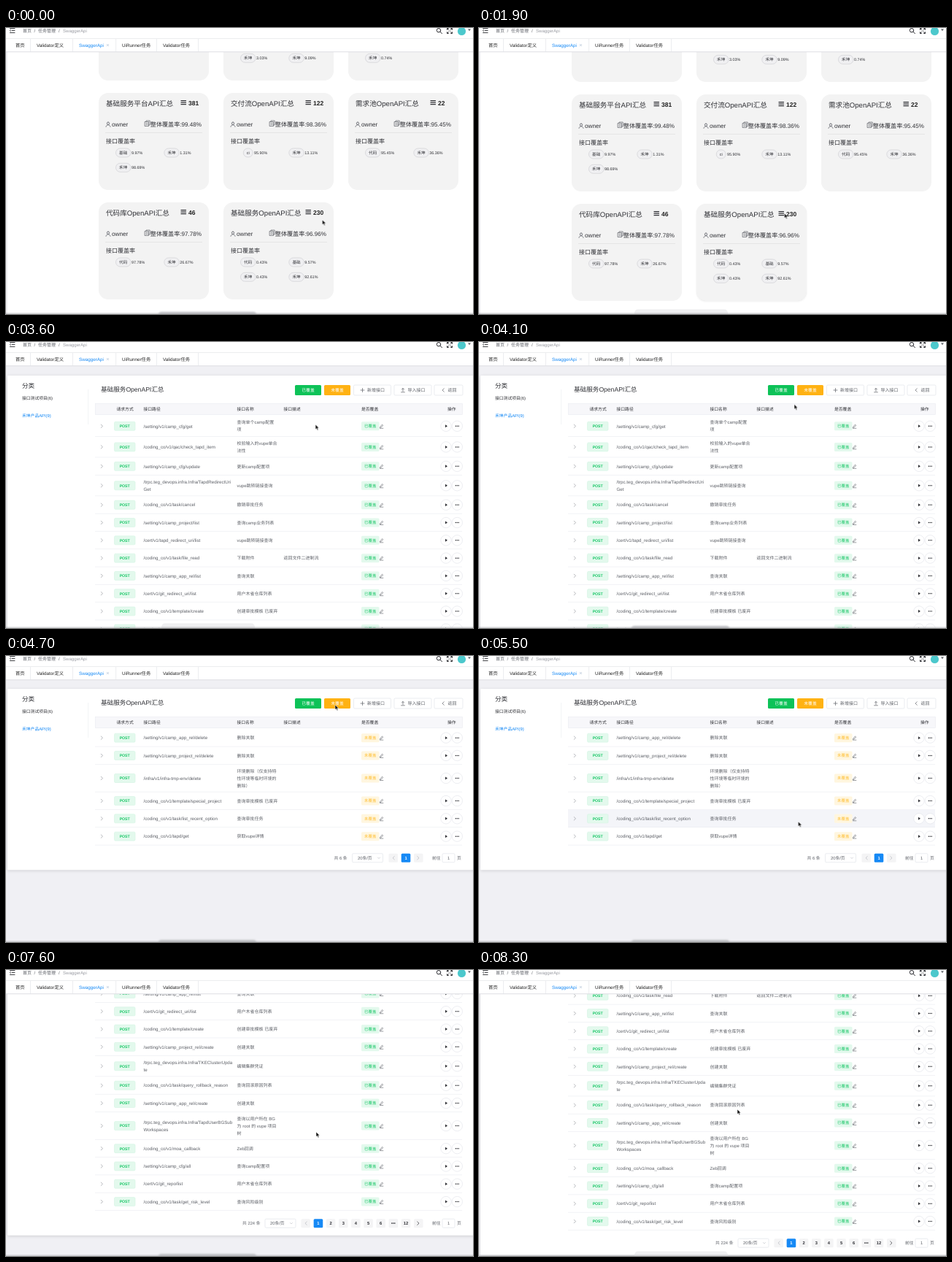
Animation, 640 px wide and 392 px high, one loop 8400 ms. Source, as an HTML page:

```html
<!DOCTYPE html>
<html lang="zh-CN">
<head>
<meta charset="utf-8">
<title>SwaggerApi</title>
<style>
html, body { margin: 0; width: 100%; height: 100%; overflow: hidden; background: #f0f0f4; }
svg { display: block; width: 640px; height: 392px; }
text { font-family: "Liberation Sans", "Noto Sans CJK SC", "Noto Sans CJK", sans-serif; text-rendering: geometricPrecision; white-space: pre; }
.icon { fill: none; stroke-linecap: round; stroke-linejoin: round; }
</style>
</head>
<body>
<svg id="stage" viewBox="0 0 640 392"></svg>
<script>
const LOOP = 8400;
const GREEN = '#13c563', BLUE = '#1689f5', INK = '#5c5f66', DARK = '#303136', LINE = '#e9ebf0';
let css = '';

// Animated group: stops are [ms, value]
function animate(name, stops, property, timing) {
  const all = [...stops, [LOOP, stops[stops.length - 1][1]]];
  const frames = all.map(([ms, v]) => `${ms / LOOP * 100}%{${property(v)}}`).join('');
  css += `@keyframes ${name}{${frames}}.${name}{animation:${name} ${LOOP}ms ${timing} infinite}`;
}
const move = (name, stops) => animate(name, stops, ([x, y]) => `transform:translate(${x}px,${y}px)`, 'linear');
const toggle = (name, stops) => animate(name, stops, v => `opacity:${v}`, 'step-end');

const group = (cls, content) => `<g class="${cls}">${content}</g>`;
const rect = (x, y, w, h, fill, rx = 0, stroke = 'none', extra = '') =>
  `<rect x="${x}" y="${y}" width="${w}" height="${h}" rx="${rx}" fill="${fill}" stroke="${stroke}" stroke-width=".6" ${extra}/>`;
const icon = (x, y, d, color = INK, width = .8) =>
  `<path class="icon" transform="translate(${x} ${y})" d="${d}" stroke="${color}" stroke-width="${width}"/>`;
// y is the vertical middle of the line
const text = (x, y, s, size = 6, color = INK, anchor = 'start', weight = 400) =>
  `<text x="${x}" y="${y + size * .36}" font-size="${size}" fill="${color}" text-anchor="${anchor}" font-weight="${weight}">${s}</text>`;
const lines = (x, y, s, size) => {
  const parts = s.split('|');
  return parts.map((p, i) => text(x, y + (i - (parts.length - 1) / 2) * 10, p, size)).join('');
};
const RIGHT = 'M-1.3 -2.2L1 0L-1.3 2.2', LEFT = 'M1.3 -2.2L-1 0L1.3 2.2';
const DOWN = 'M-1.5 -.7L0 .8L1.5 -.7';

// ---- Overview cards ----
function card(col, row, title, count, total, tags) {
  const x = 127 + col * 171, y = 89 + row * 150;
  let out = rect(x, y, 151, 133, '#f3f3f3', 13);
  if (title === '基础服务OpenAPI汇总')
    out += group('cardHover', rect(x, y, 151, 133, '#f3f3f3', 13, 'none', 'style="filter:drop-shadow(0 1px 1px #0001)"'));
  out += text(x + 10, y + 14.4, title, 9.6, DARK)
    + icon(x + 113, y + 13.2, 'M0 -2.5H6.5M0 0H6.5M0 2.5H6.5', DARK, 1.2)
    + text(x + 123, y + 14, count, 8.5, '#222', 'start', 700)
    + icon(x + 13, y + 43, 'M0 -3a1.7 1.7 0 1 1 0 3.4a1.7 1.7 0 1 1 0 -3.4M-3 3.4C-2.6 -.2 2.6 -.2 3 3.4', INK, .8)
    + text(x + 18, y + 43.3, 'owner', 8.2, DARK)
    + icon(x + 63.5, y + 39.5, 'M0 0H5V6H0ZM1.5 0V-1.5H6.7V4.5H5M1.3 2H3.7M1.3 4H3.7', INK, .7)
    + text(x + 141, y + 43.3, `整体覆盖率:${total}%`, 8.1, DARK, 'end')
    + rect(x + 9, y + 54, 133, .6, '#dcdcdc')
    + text(x + 10, y + 66, '接口覆盖率', 8, DARK);
  tags.forEach(([label, pct], i) => {
    if (!label) return;
    const tx = x + 23.5 + i % 2 * 66.3, ty = y + 82 + (i >> 1) * 20.3;
    const w = label === 'ci' ? 13 : 20.5;
    out += rect(tx + (20.5 - w) / 2, ty - 6, w, 12, '#f0f0f2', 6, '#c9cace')
      + text(tx + 10.2, ty, label, 5.6, DARK, 'middle', 500)
      + text(tx + 21.5 - (20.5 - w) / 2 * .8, ty, pct + '%', 5.4, DARK);
  });
  return out;
}
const TEAM = '禾坤';
const overview = rect(2, 30, 638, 400, '#fff') + group('cardShift',
  card(0, -1, '', '', '', [])
  + card(1, -1, '', '', '', [[], [], [TEAM, '3.03'], [TEAM, '9.09']])
  + card(2, -1, '', '', '', [[], [], [TEAM, '0.74']])
  + card(0, 0, '基础服务平台API汇总', 381, '99.48', [['基础', '9.97'], [TEAM, '1.31'], [TEAM, '98.69']])
  + card(1, 0, '交付流OpenAPI汇总', 122, '98.36', [['ci', '95.90'], [TEAM, '13.11']])
  + card(2, 0, '需求池OpenAPI汇总', 22, '95.45', [['代码', '95.45'], [TEAM, '36.36']])
  + card(0, 1, '代码库OpenAPI汇总', 46, '97.78', [['代码', '97.78'], [TEAM, '26.67']])
  + card(1, 1, '基础服务OpenAPI汇总', 230, '96.96', [['代码', '0.43'], ['基础', '9.57'], [TEAM, '0.43'], [TEAM, '92.61']]));

// ---- Interface tables: path, name, description ('|' breaks a line) ----
const RPC = '/trpc.teg_devops.infra.Infra/';
const coveredRows = [
  ['/setting/v1/camp_cfg/get', '查询单个camp配置|项'],
  ['/coding_co/v1/qac/check_tapd_item', '校验输入的vupe单合|法性'],
  ['/setting/v1/camp_cfg/update', '更新camp配置项'],
  [RPC + 'TapdRedirectUri|Get', 'vupe跳转链接查询'],
  ['/coding_co/v1/task/cancel', '撤销审批任务'],
  ['/setting/v1/camp_project/list', '查询camp业务列表'],
  ['/cert/v1/tapd_redirect_uri/list', 'vupe跳转链接查询'],
  ['/coding_co/v1/task/file_read', '下载附件', '返回文件二进制流'],
  ['/setting/v1/camp_app_rel/list', '查询关联'],
  ['/cert/v1/git_redirect_uri/list', '用户木雀仓库列表'],
  ['/coding_co/v1/template/create', '创建审批模板 已废弃'],
  ['/setting/v1/camp_project_rel/create', '创建关联'],
  [RPC + 'TKEClusterUpda|te', '编辑集群凭证'],
  ['/coding_co/v1/task/query_rollback_reason', '查询回滚原因列表'],
  ['/setting/v1/camp_app_rel/create', '创建关联'],
  [RPC + 'TapdUserBGSub|Workspaces', '查询以用户所在 BG|为 root 的 vupe 项目|树'],
  ['/coding_co/v1/moa_callback', 'Zeb回调'],
  ['/setting/v1/camp_cfg/all', '查询camp配置项'],
  ['/cert/v1/git_repo/list', '用户木雀仓库列表'],
  ['/coding_co/v1/task/get_risk_level', '查询风险级别'],
];
const uncoveredRows = [
  ['/setting/v1/camp_app_rel/delete', '删除关联'],
  ['/setting/v1/camp_project_rel/delete', '删除关联'],
  ['/infra/v1/infra-tmp-env/delete', '环境删除（仅支持特|性环境等临时环境的|删除）'],
  ['/coding_co/v1/template/special_project', '查询审批模板 已废弃'],
  ['/coding_co/v1/task/list_recent_option', '查询审批任务'],
  ['/coding_co/v1/tapd/get', '获取vupe详情'],
];
const ROW_HEIGHT = [0, 24.3, 28.6, 37.8];

function pager(y, total, pages, left) {
  const first = 548 - (pages.length - 1) * 17.15;
  let out = text(left, y, `共 ${total} 条`, 5.8)
    + rect(left + 27 + (total < 10 ? -2 : 4), y - 6, 42, 12, '#fff', 1.5, '#dcdfe6')
    + text(first - 66, y, '20条/页', 5.8) + icon(first - 37, y, DOWN, '#b5b8bf', .6)
    + rect(first - 23.5, y - 6, 12.5, 12, '#f4f4f5', 1.5) + icon(first - 17, y, LEFT, '#b5b8bf', .7);
  pages.forEach((p, i) => {
    const x = first + i * 17.15;
    out += rect(x - 6.3, y - 6, 12.6, 12, i ? '#f4f4f5' : BLUE, 1.5)
      + text(x, y, p, 5.8, i ? DARK : '#fff', 'middle', 700);
  });
  return out + rect(559, y - 6, 12.5, 12, '#f4f4f5', 1.5)
    + icon(565, y, RIGHT, pages.length > 1 ? DARK : '#b5b8bf', .7)
    + text(584, y, '前往', 5.8) + rect(598, y - 6, 17, 12, '#fff', 1.5, '#dcdfe6')
    + text(606.5, y, '1', 5.8, INK, 'middle') + text(618, y, '页', 5.8);
}

function table(rows, hoverIndex, hoverClass, label, color, tint, pages, total, pagerLeft) {
  let y = 100, out = '';
  rows.forEach(([path, name, note = ''], i) => {
    const h = ROW_HEIGHT[Math.max(path.split('|').length, name.split('|').length)];
    const mid = y + h / 2;
    if (i === hoverIndex) out += group(hoverClass, rect(122, y, 503, h, '#f4f5f9'));
    out += rect(122, y + h - .5, 503, .6, LINE)
      + icon(131.5, mid, RIGHT, '#888b92', .6)
      + rect(148.5, mid - 6, 28.5, 12, '#e3f9ed', 1.5, '#d3f4e2')
      + text(162.7, mid, 'POST', 5.2, GREEN, 'middle', 700)
      + lines(188.5, mid, path, 6.2) + lines(316.5, mid, name, 6) + text(380.5, mid, note)
      + rect(487, mid - 6, 24.5, 12, tint, 1.5)
      + text(499.2, mid, label, 5.4, color, 'middle')
      + icon(514.5, mid, 'M-1.8 1.2L1 -2.2L2.2 -1.2L-.5 1.9L-2 2ZM-2 3H2.4', INK, .6);
    for (const x of [603, 618.3])
      out += `<circle cx="${x}" cy="${mid}" r="7.2" fill="#fff" stroke="#dfe1e7" stroke-width=".6"/>`;
    out += `<path d="M602 ${mid - 2}L605 ${mid}L602 ${mid + 2}Z" fill="${DARK}"/>`;
    for (const dx of [-2, 0, 2]) out += `<circle cx="${618.3 + dx}" cy="${mid}" r=".75" fill="${DARK}"/>`;
    y += h;
  });
  return rect(2, 45, 640, y - 11, '#fff', 1, 'none', 'style="filter:drop-shadow(0 1px 2px #0002)"')
    + out + pager(y + 17.5, total, pages, pagerLeft);
}

function outlineButton(x, w, glyph, label) {
  return rect(x, 58, w, 14, '#fff', 1.5, '#dcdfe6')
    + icon(x + 12, 65, glyph, INK, .7) + text(x + w - 8.5, 65, label, 6, INK, 'end');
}
const head = text(22, 59, '分类', 8.6, DARK)
  + text(22, 75.5, '接口测试项目(6)', 5.8, DARK)
  + text(22, 99.5, TEAM + '产品API(9)', 5.8, BLUE)
  + rect(112.5, 64, .6, 48, LINE)
  + text(130, 63.5, '基础服务OpenAPI汇总', 8.6, DARK, 'start', 500)
  + rect(396, 58, 36, 14, '#0dc258', 1.5) + text(414, 65, '已覆盖', 5.8, '#fff', 'middle')
  + rect(436, 58, 36, 14, '#ffb213', 1.5) + text(454, 65, '未覆盖', 5.8, '#fff', 'middle')
  + outlineButton(476.5, 51, 'M-2.5 0H2.5M0 -2.5V2.5', '新增接口')
  + outlineButton(532, 51, 'M0 1.5V-2.5M-1.6 -1L0 -2.6L1.6 -1M-2.4 2.8H2.4', '导入接口')
  + outlineButton(587, 39, LEFT, '返回')
  + rect(122.5, 83.5, 503, 15, '#f7f7fa', 0, LINE)
  + [[151.5, '请求方式'], [188.5, '接口路径'], [316.5, '接口名称'], [380.5, '接口描述'], [487, '是否覆盖'], [605, '操作']]
    .map(([x, s]) => text(x, 91, s, 5.8, DARK, 'start', 500)).join('');

const detail = rect(0, 30, 640, 362, '#f0f0f4') + group('scroll',
  group('covered', table(coveredRows, 1, 'coveredHover', '已覆盖', GREEN, '#e3f9ed',
    [1, 2, 3, 4, 5, 6, '•••', 12], 224, 324))
  + group('uncovered', table(uncoveredRows, 4, 'uncoveredHover', '未覆盖', '#ffbd2e', '#fff6df', [1], 6, 449.5))
  + head);

// ---- Fixed top bar ----
const tabs = [[13, '首页', 33], [42, 'Validator定义', 91], [100, 'SwaggerApi', 150.5], [159, 'UiRunner任务', 206], [215, 'Validator任务', 263]];
const topBar = rect(0, 0, 640, 33, '#fff') + rect(0, 14, 640, .7, '#e4e5e9') + rect(0, 32.3, 640, .9, '#d9dae0')
  + icon(5.5, 3.5, 'M0 -3H6.5M2.5 0H6.5M0 3H6.5M1 -1.2L-.3 0L1 1.2', DARK, .9)
  + text(23, 4, '首页', 6) + text(38.5, 4, '/', 6) + text(44, 4, '任务管理', 6) + text(72, 4, '/', 6)
  + text(78, 4, 'SwaggerApi', 6.1, '#9a9ca3')
  + tabs.map(([x, s, edge], i) => text(x, 23.5, s, 6.3, i === 2 ? BLUE : '#222', 'start', i === 2 ? 400 : 500)
    + rect(edge, 15, .6, 17.5, '#e0e1e6')).join('')
  + icon(139.5, 23.5, 'M-1.2 -1.2L1.2 1.2M1.2 -1.2L-1.2 1.2', '#9fb4cc', .6)
  + icon(593, 3.2, 'M2.7 0a2.7 2.7 0 1 1 -5.4 0a2.7 2.7 0 1 1 5.4 0M2 2L4.5 4.5', DARK, 1)
  + icon(608, 4, 'M-3.5 -1.5V-3.5H-1.5M1.5 -3.5H3.5V-1.5M3.5 1.5V3.5H1.5M-1.5 3.5H-3.5V1.5M-3.3 -3.3L-1 -1M3.3 -3.3L1 -1M-3.3 3.3L-1 1M3.3 3.3L1 1', DARK, .9)
  + '<circle cx="624.5" cy="4.5" r="5.6" fill="#4cc8cc"/><path d="M633 1.5H637L635 4Z" fill="#55585f"/>';

const dock = group('dockDark', rect(209, 389, 134, 8, '#c2c3c7', 4, 'none', 'style="filter:blur(1.2px)"'))
  + group('dockLight', rect(213, 385.5, 128, 12, '#efeff1', 5))
  + rect(0, 390.7, 640, .8, '#b0b1b5');
const pointer = group('pointer',
  '<path d="M0 0V6.6L1.6 5.2L2.7 7.8L3.9 7.3L2.8 4.8H4.9Z" fill="#111" stroke="#fff" stroke-width=".5"/>');

// ---- Timing ----
const OPEN = 2300, TO_UNCOVERED = 4700, TO_COVERED = 6500;
toggle('overview', [[0, 1], [OPEN, 0]]);
toggle('detail', [[0, 0], [OPEN, 1]]);
toggle('covered', [[0, 1], [TO_UNCOVERED, 0], [TO_COVERED, 1]]);
toggle('uncovered', [[0, 0], [TO_UNCOVERED, 1], [TO_COVERED, 0]]);
toggle('cardHover', [[0, 0], [800, 1]]);
toggle('coveredHover', [[0, 1], [3300, 0]]);
toggle('uncoveredHover', [[0, 0], [5300, 1], [5700, 0]]);
toggle('dockDark', [[0, 1], [900, 0], [3700, 1], [8000, 0]]);
toggle('dockLight', [[0, 0], [900, 1], [3700, 0], [8000, 1]]);
move('cardShift', [[0, [0, 0]], [600, [0, 0]], [900, [0, 2]]]);
move('scroll', [[0, [0, 0]], [2900, [0, 0]], [3600, [0, 1]], [4600, [0, 1]], [4700, [0, 0]],
  [6700, [0, 0]], [7000, [0, -130]], [7400, [0, -287]], [7700, [0, -287]], [8100, [0, -260]]]);
move('pointer', [[0, [433.5, 263]], [900, [433, 262]], [1700, [418.5, 254]], [2300, [418.5, 254]],
  [2700, [413, 152]], [2900, [413, 152]], [4100, [432, 85.5]], [4500, [451, 67]], [4800, [451, 67]],
  [5400, [437.5, 227]], [5600, [437.5, 227]], [6300, [416, 67]], [6600, [416, 67]], [7000, [425, 222]],
  [7700, [425, 222]], [8300, [354, 191]]]);

const style = document.createElement('style');
style.textContent = css;
document.head.append(style);
document.getElementById('stage').innerHTML =
  group('overview', overview) + group('detail', detail) + dock + topBar + pointer;
</script>
</body>
</html>
```
